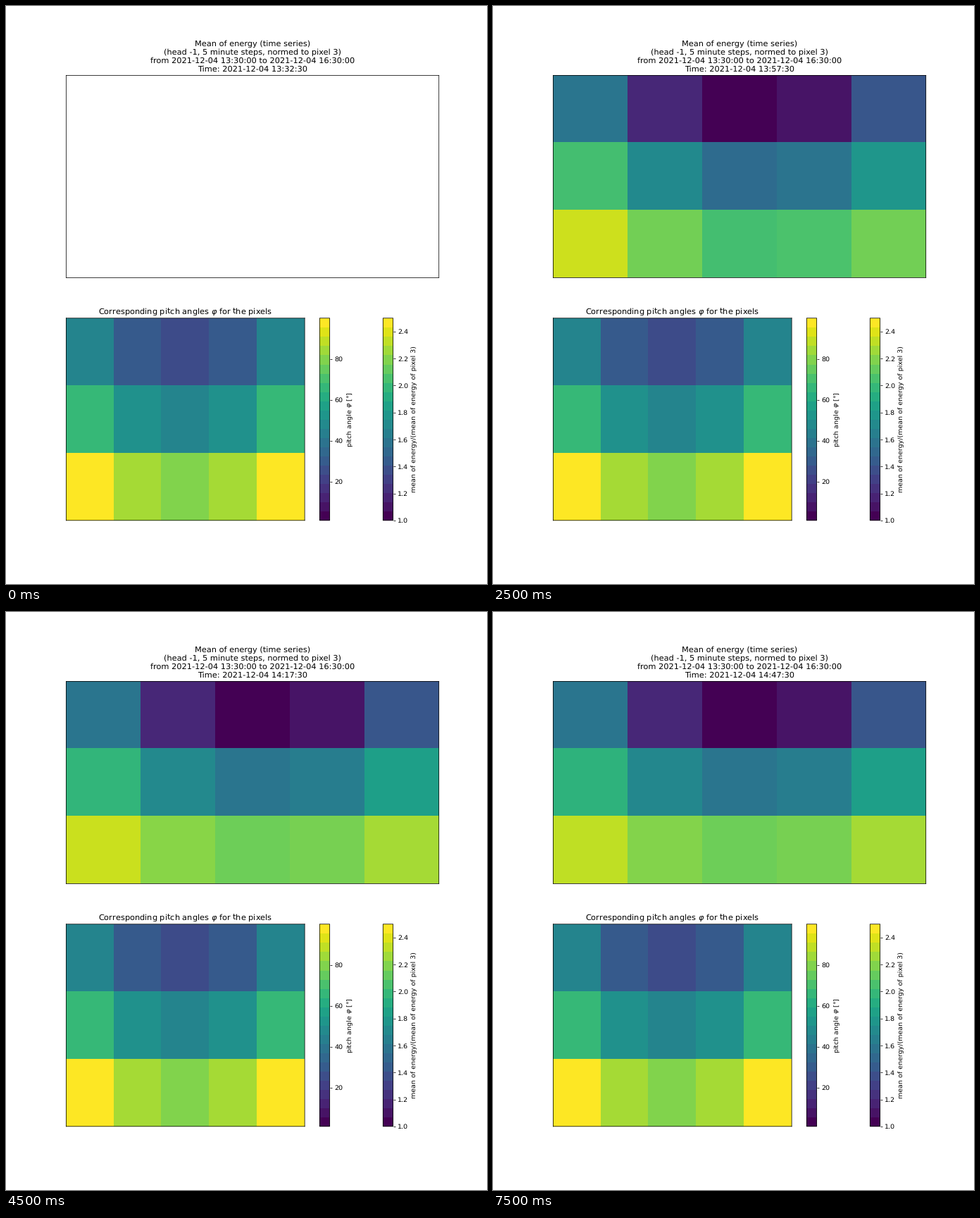
Animation of 683x820 px, one loop 8 s. Source, as a matplotlib script:

```python
import numpy as np
import matplotlib.pyplot as plt
from matplotlib.animation import FuncAnimation
from matplotlib.cm import ScalarMappable
from matplotlib.colors import Normalize

W, H, DPI = 683, 820, 68.3
STEPS, STEP_MS = 16, 500
FIRST = 3  # first step with data

# Columns run from -2 to 2 around the middle, rows from 0 at the top.
ROW, COL = np.mgrid[0:3, -2:3]


def pitch():
    """Pitch angle of each pixel in percent of its scale."""
    return 23 + 15 * ROW + 7 * ROW**2 + 5.5 * COL**2


def energy(step):
    """Energy of each pixel in percent of its scale."""
    rise = min(1, 0.4 + 0.1 * step)
    gust = 5 * np.exp(-((step - 5.5) / 2.5) ** 2)
    bowl = (8.2 - 2.8 * ROW) * COL**2
    tilt = (ROW - 3) * COL
    left = (ROW > 0) * np.maximum(-COL, 0)
    return 39 * rise * ROW + bowl + tilt + gust * left


def pixel_map(ax, values):
    ax.set(xticks=[], yticks=[])
    return ax.imshow(values, cmap="viridis", vmin=0, vmax=100,
                     aspect="auto", interpolation="nearest")


def add_bar(ax, low, high, ticks, label):
    bands = plt.get_cmap("viridis").resampled(22)
    fig.colorbar(ScalarMappable(Normalize(low, high), bands),
                 ax=ax, ticks=ticks, label=label)


def clock(step):
    minutes = 13 * 60 + 32 + 5 * step
    return f"Time: 2021-12-04 {minutes // 60}:{minutes % 60:02d}:30"


plt.rcParams.update({"font.family": "DejaVu Sans", "text.hinting": "none",
                     "path.snap": False})
fig, (top, low) = plt.subplots(2, 1, dpi=DPI,
                               figsize=((W + .01) / DPI, (H + .01) / DPI))
image = pixel_map(top, energy(FIRST))
pixel_map(low, pitch())
low.set_title(r"Corresponding pitch angles $\varphi$ for the pixels")

add_bar(low, 1, 2.5, np.arange(1, 2.5, 0.2),
        "mean of energy/(mean of energy of pixel 3)")
add_bar(low, 1, 99.9, np.arange(20, 100, 20), r"pitch angle $\varphi$ [°]")

heading = [
    "Mean of energy (time series)",
    "(head -1, 5 minute steps, normed to pixel 3)",
    "from 2021-12-04 13:30:00 to 2021-12-04 16:30:00",
    clock(0),
]
lines = [fig.text(0.5125, 1 - (57 + 12 * i) / H, text, size=12,
                  ha="center", va="baseline")
         for i, text in enumerate(heading)]


def update(step):
    lines[-1].set_text(clock(step))
    image.set_visible(step >= FIRST)
    image.set_data(energy(step))
    return image, lines[-1]


anim = FuncAnimation(fig, update, frames=STEPS, interval=STEP_MS,
                     repeat=True, repeat_delay=0)
plt.show()
```
